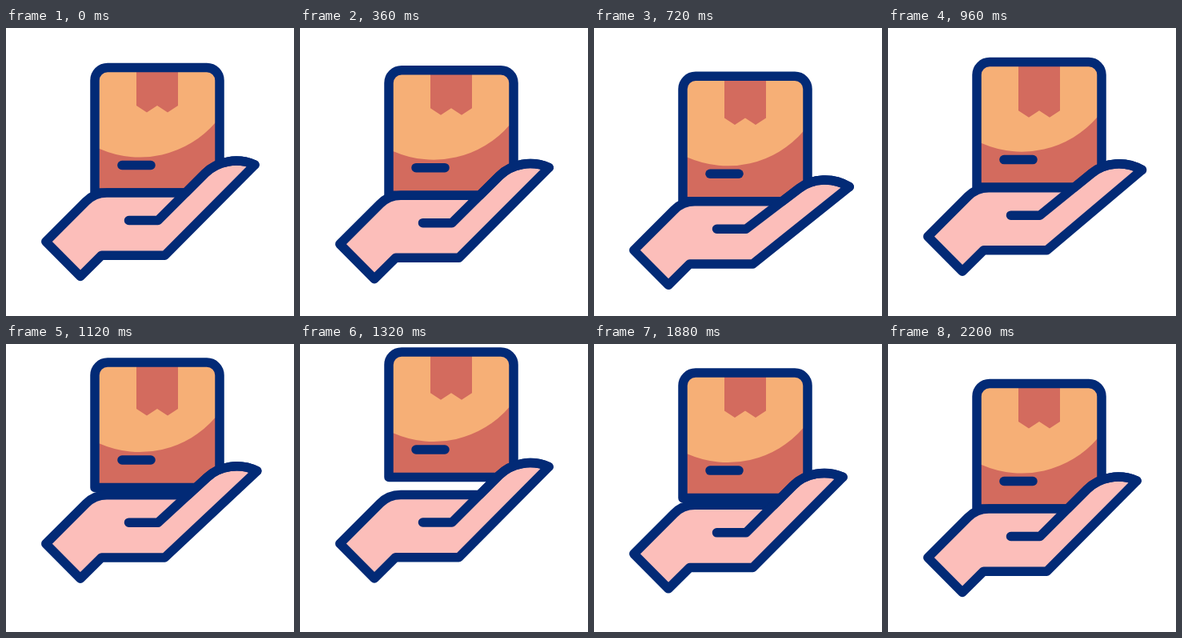
Animation of 360x360 px, one loop 2240 ms. Source, as an HTML page:

```html
<!DOCTYPE html>
<html lang="en">
<head>
<meta charset="utf-8">
<title>Parcel in hand</title>
<style>
  html, body { margin: 0; width: 100%; height: 100%; overflow: hidden; background: #fff; }
  svg { display: block; width: 100vw; height: 100vh; }
  .line { stroke: #022a76; stroke-width: 11.5; stroke-linecap: round; stroke-linejoin: round; fill: none; }
  .light { fill: #f6af76; }
  .dark { fill: #d36b5e; }
  #palm { fill: #fcbeba; }
</style>
</head>
<body>
<svg viewBox="0 0 360 360">
  <g id="box">
    <path class="dark" d="M115 100H265V206H115Z"/>
    <path class="light" d="M115 52H264V118H262A125 125 0 0 1 117 151H115Z"/>
    <path class="dark" id="tape"/>
    <path class="line" d="M111 206V65.5A16 16 0 0 1 127 49.5H251A16 16 0 0 1 267 65.5V206Z"/>
    <path class="line" d="M145 171.5H181"/>
  </g>
  <g id="hand">
    <path class="line" id="palm"/>
    <path class="line" id="crease"/>
  </g>
</svg>
<script>
  const LOOP = 2240, STEP = 40;
  const KNUCKLE = { x: 190, y: 240.5 };
  const PALM_TOP = 206;
  const MAX_BEND = 8 * Math.PI / 180;

  const [box, hand, tape, palm, crease] =
    ["box", "hand", "tape", "palm", "crease"].map(id => document.getElementById(id));

  // Eased 0 to 1 between two times.
  function ramp(t, from, to) {
    const p = Math.min(1, Math.max(0, (t - from) / (to - from)));
    return p * p * (3 - 2 * p);
  }

  // Rises to 1 at `peak`, stays until `leave`, is back at 0 at `end`.
  const pulse = (t, start, peak, end, leave = peak) => ramp(t, start, peak) - ramp(t, leave, end);

  function tapePath(stretch) {
    const bottom = 97 + stretch;
    return `M163 52V${bottom}l13 8.5 13-8.5 13 8.5 13-8.5V52Z`;
  }

  // The finger turns stiffly around the knuckle.
  function fingerPath(angle) {
    const cos = Math.cos(angle), sin = Math.sin(angle);
    const turn = (x, y) =>
      `${KNUCKLE.x + x * cos - y * sin} ${KNUCKLE.y + x * sin + y * cos}`;
    return `L${turn(59, -59)}C${turn(74, -74)} ${turn(99, -79)} ${turn(121, -69.5)}`;
  }

  function palmPath(angle) {
    const joint = KNUCKLE.x + (KNUCKLE.y - PALM_TOP) / Math.tan(Math.PI / 4 - angle);
    return `M49.8 267L100 216.8C107 209.5 116 206 126 ${PALM_TOP}H${joint}` +
      `${fingerPath(angle)}L198.5 284.2H119.5L93 310.5Z`;
  }

  const moveDown = (node, y) => node.setAttribute("transform", `translate(0 ${y})`);

  function draw(t) {
    const bounce = pulse(t, 1680, 1920, 2200);
    const angle = MAX_BEND * pulse(t, 320, 780, 1310);

    // Both sink together, then the hand throws the box and catches it.
    moveDown(box, 10.8 * pulse(t, 160, 720, 1320)
      - 39.5 * pulse(t, 720, 1320, 1680) - 14.5 * bounce);
    moveDown(hand, 10.8 * pulse(t, 160, 720, 1140)
      - 17.5 * pulse(t, 720, 1140, 1650, 1320) - 5 * bounce);

    tape.setAttribute("d", tapePath(13.2 * pulse(t, 560, 960, 1520)));
    palm.setAttribute("d", palmPath(angle));
    crease.setAttribute("d", `M153.5 ${KNUCKLE.y}H${KNUCKLE.x}${fingerPath(angle)}`);
  }

  const start = performance.now();
  function tick() {
    const t = (performance.now() - start) % LOOP;
    draw(Math.floor(t / STEP) * STEP);
    requestAnimationFrame(tick);
  }
  tick();
</script>
</body>
</html>
```
